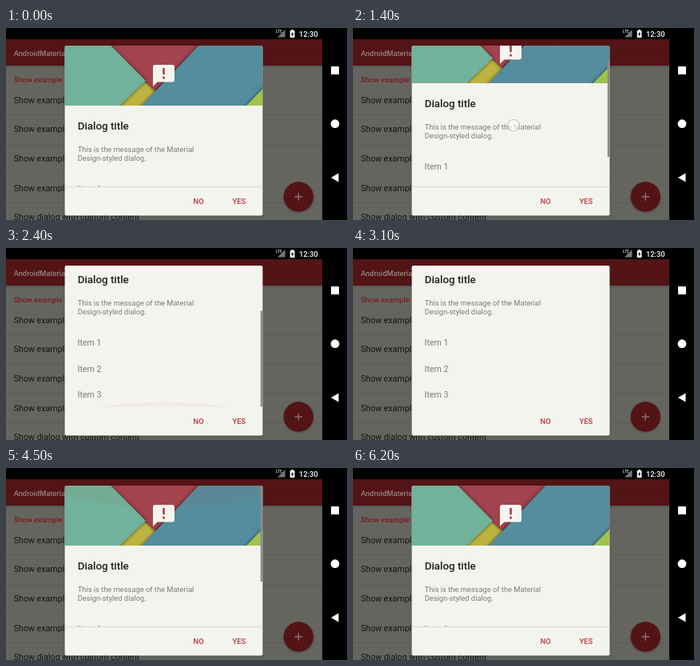
Write an HTML page that moves like this. It is 427 px wide and 240 px high and loops after 6300 ms.

```html
<!DOCTYPE html>
<html lang="en">
<head>
<meta charset="utf-8">
<title>Scrolling dialog</title>
<style>
  html, body { margin: 0; width: 100%; height: 100%; overflow: hidden; background: #000; }
  svg { display: block; width: 427px; height: 240px; font: 10.67px Roboto, sans-serif; }
  .small { font-size: 9.33px; }
  .bold { font-weight: 500; }
  .sheet { filter: drop-shadow(0 0 2px rgba(0, 0, 0, .6)); }
  .raised { filter: drop-shadow(0 1px 1.5px rgba(0, 0, 0, .25)); }
</style>
</head>
<body>
<svg viewBox="0 0 427 240">
  <defs>
    <clipPath id="view"><path d="M73.6 198.5V24q0-2 2-2H319.4q2 0 2 2V198.5z"/></clipPath>
    <clipPath id="art"><path d="M73 22H322V97H73z"/></clipPath>
  </defs>

  <!-- Dimmed activity -->
  <rect width="396" height="240" fill="#656560"/>
  <g id="list" fill="#141414"></g>
  <text class="small bold" x="9.7" y="68.2" fill="#7c1b20">Show example dialogs</text>
  <rect class="raised" y="14" width="396" height="33" fill="#531416"/>
  <text class="small bold" x="9.7" y="34.6" fill="#94807f">AndroidMaterialDialog</text>
  <circle class="raised" cx="366.3" cy="211" r="18.7" fill="#531416"/>
  <path d="M361.5 211h9.6M366.3 206.2v9.6" stroke="#857270" stroke-width="1.4"/>

  <!-- System bars -->
  <path d="M0 0H427V240H396V14H0z"/>
  <path d="M349.5 2V11.5H340z" fill="#777"/>
  <text class="bold" x="337.7" y="6.4" font-size="5" fill="#ccc">LTE</text>
  <path d="M355.7 3.2h1.7V2h2.4v1.2h1.7V12h-5.8z" fill="#fff"/>
  <path d="M359 4.6l-2 3.6h1.3v2.6l2-3.7h-1.3z"/>
  <text class="small bold" x="366.9" y="11" fill="#fff">12:30</text>
  <g fill="#fff">
    <rect x="407" y="48" width="10" height="10" rx=".6"/>
    <circle cx="412" cy="119.7" r="5.4"/>
    <path d="M407 187l9.5-5.6v11.2z"/>
  </g>

  <!-- Dialog -->
  <rect class="raised" x="73.6" y="22" width="247.8" height="212.4" rx="2" fill="#f4f4ef"/>
  <g clip-path="url(#view)">
    <g id="content">
      <g clip-path="url(#art)">
        <rect x="73" y="22" width="249" height="75" fill="#a2434f"/>
        <path d="M160 55L200 90L160 130H120z" fill="#bdb440"/>
        <path class="sheet" d="M119 10H253L186 78z" fill="#a2434f"/>
        <path class="sheet" d="M60 10H119.5L175 66L130 109H60z" fill="#70b29b"/>
        <path class="sheet" d="M252.4 10H340V110H157.7z" fill="#548d9d"/>
        <g id="specks" fill="#86b4bf"></g>
        <path class="sheet" d="M330 67.500V110H288z" fill="#9fc350"/>
      </g>
      <rect x="195" y="49" width="5" height="16" fill="#a2434f"/>
      <path transform="translate(181.3 43.3) scale(1.35)" fill="#f6f4ef" fill-rule="evenodd"
        d="M20 2H4c-1.1 0-2 .9-2 2V22l4-4h14c1.1 0 2-.9 2-2V4c0-1.1-.9-2-2-2zM13 11h-2V5h2zM13 15h-2v-2h2z"/>
      <text class="bold" x="89.7" y="127.2" font-size="13.33" fill="#1f1f1e">Dialog title</text>
      <g fill="#7b7b78">
        <text class="small" x="89.7" y="154.7">This is the message of the Material</text>
        <text class="small" x="89.7" y="165.7">Design-styled dialog.</text>
        <text x="89.5" y="205.4">Item 1</text>
        <text x="89.5" y="237.5">Item 2</text>
        <text x="89.5" y="269.7">Item 3</text>
      </g>
    </g>
    <ellipse id="glowTop" cx="197.5" rx="373" ry="261" fill="#b73a3d" opacity=".06"/>
    <ellipse id="glowBottom" cx="197.5" rx="373" ry="261" fill="#b73a3d" opacity=".06"/>
    <rect id="bar" x="318.7" width="2.7" height="120" fill="#8c8c89"/>
  </g>
  <path id="divider" d="M73.6 198.5H321.4" stroke="#d5d5d0" stroke-width=".8"/>
  <g class="small bold" fill="#b8393c">
    <text x="234.6" y="220">NO</text>
    <text x="283.6" y="220">YES</text>
  </g>
  <circle id="touch" r="7.3" fill="#fff" fill-opacity=".65" stroke="#bdbdba" stroke-width="1"/>
</svg>
<script>
const LOOP = 6300, RANGE = 83, SLOP = 5, TOP = 22, BOTTOM = 198.5, GLOW_RADIUS = 261;
const el = id => document.getElementById(id);
const clamp = (v, lo = 0, hi = 1) => Math.min(hi, Math.max(lo, v));
const ramp = (t, from, to) => clamp((t - from) / (to - from));
const shown = on => on ? "visible" : "hidden";

// Each drag: [time, x, y] points of the finger
const drags = [
  [[1100, 199, 155], [1200, 199.5, 150], [1400, 201, 122], [1800, 204, 59], [2000, 205, 38]],
  [[3500, 207, 86.5], [3650, 207.5, 93], [4000, 210, 153], [4250, 211, 187], [4450, 211, 196]]
];

function finger(points, t) {
  const next = points.findIndex(p => p[0] >= t);
  const i = next < 0 ? points.length - 1 : Math.max(1, next);
  const [a, b] = [points[i - 1], points[i]];
  const k = ramp(t, a[0], b[0]);
  return [a[1] + (b[1] - a[1]) * k, a[2] + (b[2] - a[2]) * k];
}

function place(id, attrs) {
  for (const name in attrs) el(id).setAttribute(name, attrs[name]);
}

function build() {
  let list = "", specks = "", seed = 7;
  const random = () => (seed = seed * 16807 % 2147483647) / 2147483647;
  for (let i = 0; i < 5; i++) {
    const y = 93.7 + i * 36.67;
    const label = i < 4 ? "Show example dialog" : "Show dialog with custom content";
    list += `<text x="9.7" y="${y}">${label}</text>`
      + `<rect y="${y + 14.5}" width="396" height=".7" fill="#585854"/>`;
  }
  for (let i = 0; i < 45; i++) {
    const y = 24 + random() * 72, left = 266 - y;
    specks += `<circle cx="${left + random() * (320 - left)}" cy="${y}" r=".4" opacity=".6"/>`;
  }
  el("list").innerHTML = list;
  el("specks").innerHTML = specks;
}

function draw(t) {
  const back = t >= 3000;
  const points = drags[+back];
  const [begin, , startY] = points[0], end = points.at(-1)[0];
  const [x, y] = finger(points, t);
  const pulled = Math.max(0, Math.abs(y - startY) - SLOP);
  const moved = Math.min(RANGE, pulled);
  const scroll = back ? RANGE - moved : moved;
  const glow = clamp((pulled - RANGE) * 2.75, 0, 30) * (1 - ramp(t, end, end + 500));
  const fade = back ? 5050 : 2400;

  place("content", { transform: `translate(0 ${-scroll})` });
  place("glowTop", { cy: TOP + glow - GLOW_RADIUS, visibility: shown(back && glow > 0) });
  place("glowBottom", { cy: BOTTOM - glow + GLOW_RADIUS, visibility: shown(!back && glow > 0) });
  place("bar", {
    y: TOP + scroll * 56.5 / RANGE,
    opacity: pulled > 0 ? 1 - ramp(t, fade, fade + 250) : 0
  });
  place("divider", { opacity: back ? clamp(moved / 4) : 1 - ramp(t, 1800, 2000) });
  place("touch", { cx: x, cy: y, visibility: shown(t >= begin && t <= end) });
}

function tick() {
  draw(performance.now() % LOOP);
  requestAnimationFrame(tick);
}

build();
tick();
</script>
</body>
</html>
```
